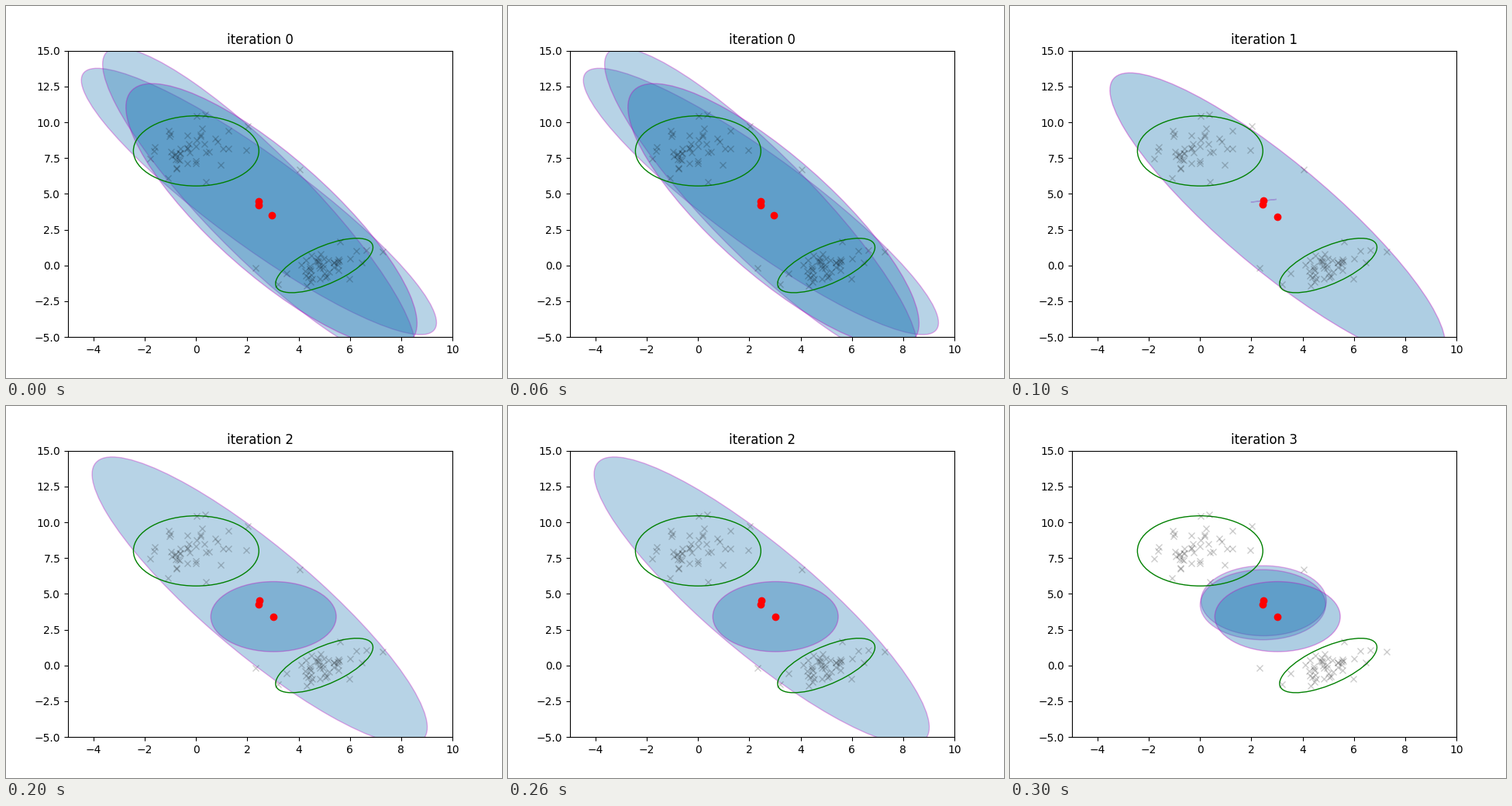
Recreate the animation shown at these times as a matplotlib script. Size 640 px wide and 480 px high, loop 400 ms.

```python
import numpy as np
import matplotlib.pyplot as plt
from matplotlib.animation import FuncAnimation
from matplotlib.patches import Ellipse

R = np.sqrt(-2 * np.log(0.05))  # 95 % radius of a unit Gaussian
ROUND = (R, R, 0)
TILTED = (1.9, 1.9, .667)
WIDE = (6.54, 10.04, -.88)      # spans both clusters
SLIVER = (.5, .1, .999)
WEIGHTS = (.32, .32, .36)

# components as (centre, (half width, half height, correlation) or None)
A, B, C = (2.48, 4.52), (2.45, 4.24), (3.02, 3.41)
STEPS = [
    [((2.45, 4.47), (6.93, 9.3, -.91)),
     ((2.45, 4.2), (6.1, 11, -.895)),
     ((2.94, 3.5), (5.68, 9.2, -.82))],
    [(A, SLIVER), (B, None), (C, WIDE)],
    [(A, WIDE), (B, None), (C, ROUND)],
    [(A, ROUND), (B, ROUND), (C, ROUND)],
]


def covariance(a, b, rho):
    return np.array([[a * a, rho * a * b], [rho * a * b, b * b]])


def ellipse(centre, shape, **style):
    vals, vecs = np.linalg.eigh(covariance(*shape))
    minor, major = 2 * np.sqrt(vals)
    angle = np.degrees(np.arctan2(vecs[1, 1], vecs[0, 1]))
    return Ellipse(centre, major, minor, angle=angle, **style)


def cluster(centre, shape, count, reach, rim):
    """Random points of a Gaussian cut off at a radius, plus its outer points."""
    core = rng.normal(size=(count * 4, 2))
    core = core[np.hypot(*core.T) < reach][:count]
    core = core @ np.linalg.cholesky(covariance(*shape)).T / R + centre
    return np.vstack([core, rim]).T


rng = np.random.default_rng(4)
TRUTH = [((0, 8), ROUND), ((5, 0), TILTED)]
RIMS = [
    [(.03, 10.43), (.36, 10.54), (2.02, 9.72), (1.96, 8.05), (4.04, 6.7),
     (-1.79, 7.45), (.39, 5.83), (1.27, 9.4), (-1.07, 9.4), (-1.1, 6.1)],
    [(5.6, 1.67), (6.65, 1.07), (7.29, .96), (6.47, .2), (5.98, -.93),
     (2.33, -.17), (3.2, -1.31), (4.32, -1.42), (3.54, -.55), (4.5, .7)],
]
POINTS = [cluster(*truth, 37, 1.7, rim) for truth, rim in zip(TRUTH, RIMS)]

fig, ax = plt.subplots(figsize=(6.4, 4.8), dpi=100)


def draw(i):
    ax.clear()
    ax.set(xlim=(-5, 10), ylim=(-5, 15), title=f"iteration {i}")
    for x, y in POINTS:
        ax.plot(x, y, "kx", alpha=.2)
    for (centre, shape), weight in zip(STEPS[i], WEIGHTS):
        if shape:
            ax.add_patch(ellipse(centre, shape, fc="C0", ec="m", alpha=weight))
        ax.plot(*centre, "ro")
    for centre, shape in TRUTH:
        ax.add_patch(ellipse(centre, shape, fill=False, ec="g"))


anim = FuncAnimation(fig, draw, frames=len(STEPS), interval=100,
                     repeat=True, repeat_delay=0)
plt.show()
```
